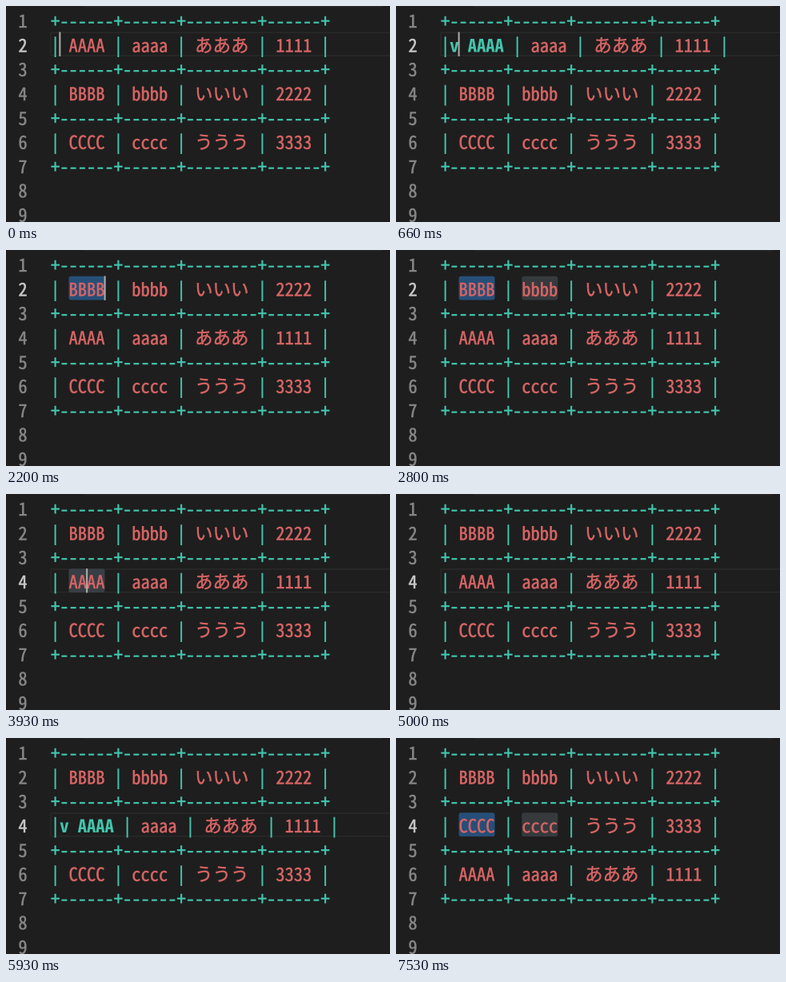
Animation of 480x270 px, one loop 8 s. Source, as an HTML page with a canvas:

```html
<!DOCTYPE html>
<html lang="en">
<head>
<meta charset="utf-8">
<title>Editor table</title>
<style>
  html, body { margin: 0; width: 100%; height: 100%; overflow: hidden; background: #1e1e1e; }
  canvas { display: block; width: 480px; height: 270px; }
</style>
</head>
<body>
<canvas id="stage"></canvas>
<script>
const W = 480, H = 270, LOOP = 8000;
const CELL = 11.25, LEFT = 56, LINE = 30.32, TOP = 2.2, ASCENT = 24.8;
const FONT = CELL * 2 + 'px "Noto Sans Mono CJK JP", "Noto Sans CJK JP", "Noto Sans Mono", monospace';
const TEAL = '#43c5ad', RED = '#d56464';
const RULE = '+------+------+--------+------+';
const ROWS = {
  A: '| AAAA | aaaa | あああ | 1111 |',
  B: '| BBBB | bbbb | いいい | 2222 |',
  C: '| CCCC | cccc | ううう | 3333 |'
};

// Each step changes the editor state from its time (ms) onwards.
const steps = [
  [0, { order: 'ABC', line: 2, col: 1, caret: true, typed: false, select: false, match: false, word: false }],
  [400, { caret: false }],
  [660, { typed: true, col: 2, caret: true }],
  [1200, { caret: false }],
  [1660, { caret: true }],
  [2200, { order: 'BAC', typed: false, col: 6, select: true }],
  [2330, { match: true }],
  [2800, { caret: false }],
  [3330, { line: 3, caret: true, select: false, match: false }],
  [3530, { line: 4 }],
  [3730, { col: 5 }],
  [3800, { word: true }],
  [3930, { col: 4 }],
  [4130, { col: 3 }],
  [4330, { col: 2 }],
  [4460, { col: 1, word: false }],
  [5000, { caret: false }],
  [5460, { typed: true, col: 2, caret: true }],
  [5930, { caret: false }],
  [6460, { caret: true }],
  [6930, { order: 'BCA', typed: false, col: 6, select: true }],
  [7000, { match: true }],
  [7530, { caret: false }]
];

// Twice the stage resolution, so text lands between whole pixels.
const canvas = document.getElementById('stage');
const ctx = canvas.getContext('2d');
const ratio = 2 * (window.devicePixelRatio || 1);
canvas.width = W * ratio;
canvas.height = H * ratio;
ctx.scale(ratio, ratio);

const xOf = col => LEFT + col * CELL;
const yOf = line => TOP + (line - 1) * LINE;

function stateAt(t) {
  const state = {};
  for (const [time, change] of steps) {
    if (time <= t) Object.assign(state, change);
  }
  return state;
}

function rect(x, y, w, h, color) {
  ctx.fillStyle = color;
  ctx.fillRect(x, y, w, h);
}

function mark(line, col, color) {
  ctx.fillStyle = color;
  ctx.beginPath();
  ctx.roundRect(xOf(col), yOf(line) + 0.2, CELL * 4, LINE - 0.6, 2.5);
  ctx.fill();
}

// A thin outline thickens the strokes a little.
function glyph(ch, x, line, color, bold) {
  const y = yOf(line) + ASCENT;
  ctx.font = bold ? 'bold ' + FONT : FONT;
  ctx.fillStyle = ctx.strokeStyle = color;
  ctx.fillText(ch, x, y);
  if (!bold) ctx.strokeText(ch, x, y);
}

// Kana take two cells, everything else one; the first `strong` characters are teal and bold.
function text(str, line, color, strong = 0) {
  let col = 0;
  [...str].forEach((ch, i) => {
    const bold = i < strong && ch !== '|';
    if (ch !== ' ') glyph(ch, xOf(col), line, bold || ch === '|' ? TEAL : color, bold);
    col += ch > '\u3000' ? 2 : 1;
  });
}

function draw(t) {
  const s = stateAt(t);
  rect(0, 0, W, H, '#1e1e1e');
  rect(97, 0, 373, 1.5, '#28282a');

  const y = yOf(s.line);
  if (!s.select) {
    ctx.strokeStyle = '#292929';
    ctx.lineWidth = 1.6;
    ctx.strokeRect(LEFT, y + 0.8, W, LINE - 1.6);
  }
  if (s.select) mark(s.line, 2, '#264f78');
  if (s.match) mark(s.line, 9, '#363a3d');
  if (s.word) mark(s.line, 2, '#383e44');

  ctx.lineWidth = 0.5;
  ctx.lineJoin = 'round';
  for (let n = 1; n <= 9; n++) {
    glyph(String(n), 15.4, n, n === s.line ? '#c6c6c6' : '#858585');
  }

  for (let n = 1; n <= 7; n += 2) text(RULE, n, TEAL);
  [...s.order].forEach((key, i) => {
    const line = 2 + i * 2;
    const typed = s.typed && line === s.line;
    const row = typed ? ROWS[key].replace('|', '|v') : ROWS[key];
    text(row, line, RED, typed ? row.indexOf('|', 1) : 0);
  });

  if (s.caret) rect(xOf(s.col) - 0.9, y, 2, LINE, '#aeafad');
}

const start = performance.now();
function frame() {
  draw((performance.now() - start) % LOOP);
  requestAnimationFrame(frame);
}
draw(0);
requestAnimationFrame(frame);
</script>
</body>
</html>
```
